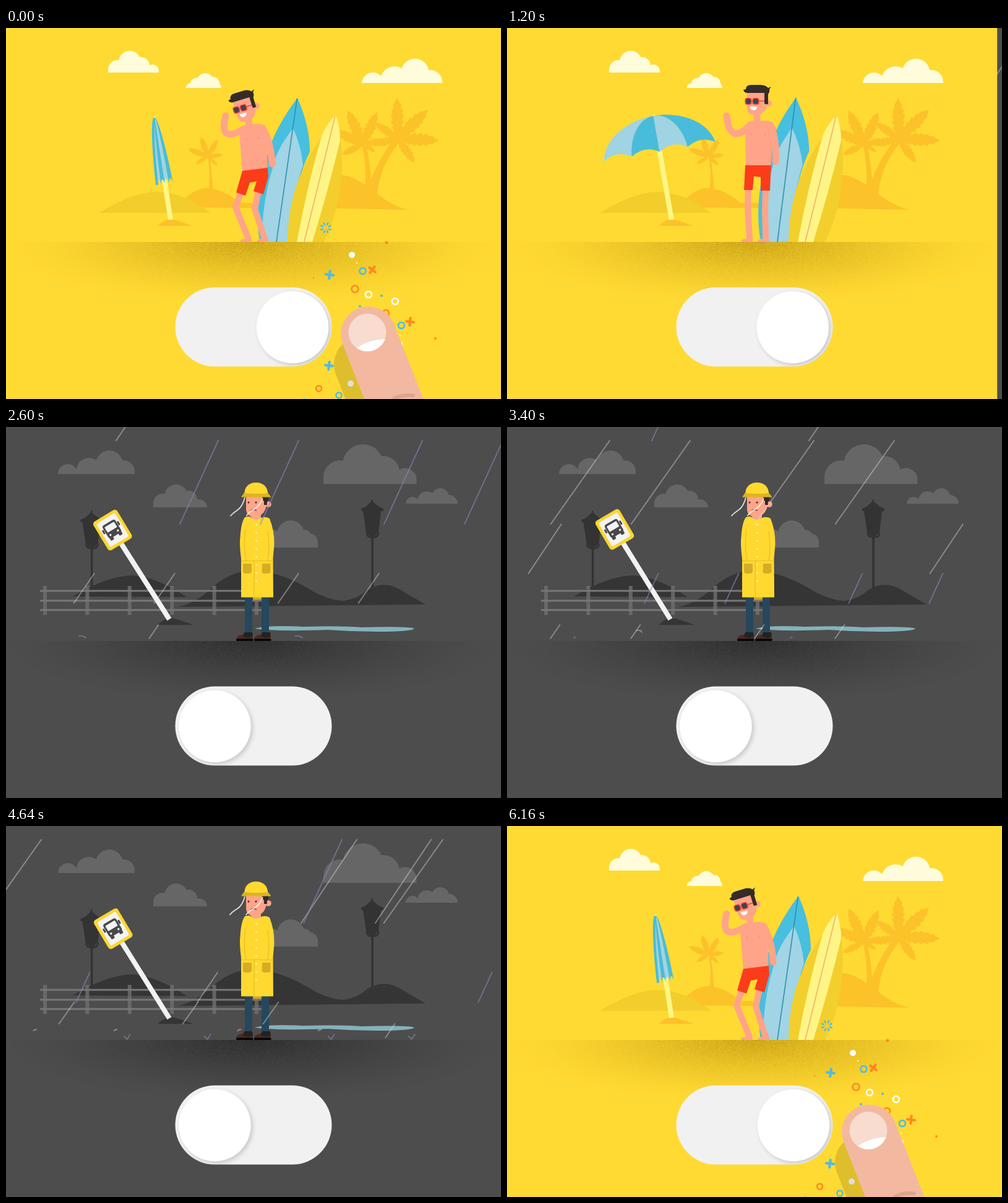
These frames come from a looping animation (800 by 600 pixels, 6.2 s). An HTML page with a canvas:

```html
<!DOCTYPE html>
<html lang="en">
<head>
<meta charset="utf-8">
<title>Weather switch</title>
<style>
html, body { margin: 0; width: 100%; height: 100%; overflow: hidden; background: #ffda33; }
canvas { display: block; }
</style>
</head>
<body>
<canvas id="stage" width="800" height="600"></canvas>
<script>
const c = document.getElementById('stage').getContext('2d');
const LOOP = 6200, STEP = 40;
const SKIN = '#ffa488', SAND = '#fcc22a', DARK = '#353535', GOLD = '#ffd930';

const clamp = u => Math.max(0, Math.min(1, u));
const span = (t, a, b) => clamp((t - a) / (b - a));
const inOut = u => u < .5 ? 2 * u * u : 1 - 2 * (1 - u) * (1 - u);
const out = u => 1 - Math.pow(1 - u, 3);
const mix = (a, b, k) => a + (b - a) * k;
const rad = d => d * Math.PI / 180;

function shape(color, d) { c.fillStyle = color; c.fill(new Path2D(d)); }
function line(color, w, d, cap = 'butt') {
  c.strokeStyle = color; c.lineWidth = w; c.lineCap = cap; c.lineJoin = 'round';
  c.stroke(new Path2D(d));
}
function disc(color, x, y, r) {
  c.fillStyle = color; c.beginPath(); c.arc(x, y, r, 0, 7); c.fill();
}
function box(color, x, y, w, h, r = 0) {
  c.fillStyle = color; c.beginPath(); c.roundRect(x, y, w, h, r); c.fill();
}
function at(x, y, deg, draw) {
  c.save(); c.translate(x, y); c.rotate(rad(deg)); draw(); c.restore();
}

// Grainy half-ellipse under the feet
function grain(r, g, b, strength) {
  const el = document.createElement('canvas');
  el.width = 800; el.height = 110;
  const g2 = el.getContext('2d'), img = g2.createImageData(800, 110);
  let seed = 7;
  for (let i = 0; i < 800 * 110; i++) {
    seed = (seed * 16807) % 2147483647;
    const x = i % 800, y = i / 800 | 0;
    const d = Math.hypot((x - 400) / 400, y / 100);
    const a = strength * Math.pow(Math.max(0, 1 - d), 1.4) * (.7 + .6 * seed / 2147483647);
    img.data.set([r, g, b, 255 * Math.min(1, a)], i * 4);
  }
  g2.putImageData(img, 0, 0);
  return el;
}
const warmGround = grain(160, 118, 0, .5), coldGround = grain(22, 22, 22, .52);

function cloud(color, base, lobes) {
  c.save();
  c.beginPath(); c.rect(0, 0, 800, base); c.clip();
  c.fillStyle = color;
  for (const [x, y, r] of lobes) {
    c.beginPath(); c.arc(x, y, r, 0, 7); c.rect(x - r, y, 2 * r, base - y); c.fill();
  }
  c.restore();
}

function leaf(x, y, tx, ty) {
  const len = Math.hypot(tx - x, ty - y), n = 7;
  at(x, y, Math.atan2(ty - y, tx - x) * 180 / Math.PI, () => {
    c.beginPath(); c.moveTo(0, 0);
    const h = s => len * .17 * Math.pow(Math.sin(Math.PI * clamp(s)), .7);
    for (let i = 1; i < n; i++) {
      c.lineTo(len * i / n, -h(i / n));
      c.lineTo(len * (i + .1) / n, -h(i / n) * .68);
    }
    c.lineTo(len, 0);
    for (let i = n - 1; i > 0; i--) {
      c.lineTo(len * (i + .1) / n, h(i / n) * .68);
      c.lineTo(len * i / n, h(i / n));
    }
    c.fill();
  });
}
function palm(x, y, trunk, tips) {
  shape(SAND, trunk);
  for (const [tx, ty] of tips) leaf(x, y, tx, ty);
}

function umbrella(o) {
  at(266, 310, mix(-8.8, -9.9, o), () => {
    const top = -mix(167, 170.5, o), rim = -mix(59, 111.5, o), w = mix(13, 91.5, o);
    const inner = mix(.3, .46, o), outer = mix(.8, .93, o);
    box('#fff685', -4, mix(-66, -113, o), 8, -mix(-66, -113, o), 0);
    const ctl = k => [k * w * inner, top, k * w * outer, mix(rim, top, .62)];
    for (let i = 0; i < 4; i++) {
      const a = i / 2 - 1, b = a + .5, A = ctl(a), B = ctl(b);
      shape(i % 2 ? '#49bcdb' : '#a0d3e3',
        `M0 ${top}C${A} ${a * w} ${rim}Q${(a + b) / 2 * w} ${rim - 15} ${b * w} ${rim}` +
        `C${B[2]} ${B[3]} ${B[0]} ${B[1]} 0 ${top}Z`);
    }
    if (o < .5) line('#49bcdb', 4 * (1 - 2 * o), `M0 ${top}C${ctl(-1)} ${-w} ${rim}`);
    line('#fff685', 3, `M0 ${top}v-2`);
  });
}

function boards(lean) {
  at(437, 346, lean, () => {
    c.translate(-437, -346);
    shape('#47bfdf', 'M471 113Q491 158 491 200Q474 235 465 285L456 346H410Q401 290 418 222Q428 170 471 113Z');
    shape('#a1d4e4', 'M464 162Q477 190 480 222Q466 260 457 346H414Q413 285 431 226Q436 198 464 162Z');
    line('#2f8fa8', 1.6, 'M470.500 114L437 346');
  });
  shape('#f2cf2d', 'M509 177Q480 220 466 265Q455 305 455 346H514Q541 290 543 225Q543 185 538 160Z');
  shape('#fff587', 'M533 141Q541 165 540 182Q521 262 495 346H470Q487 255 510 175Q519 153 533 141Z');
  line('#f5b564', 1.7, 'M532 142L482 346');
}

// Each joint: first pose x, y, second pose x, y
function swimmer(k) {
  const p = (ax, ay, bx, by) => `${mix(ax, bx, k)} ${mix(ay, by, k)} `;
  const limb = (d, w = 10) => line(SKIN, w, d, 'round');
  for (const dx of [0, 27]) {
    shape(SKIN, `M${378 + dx} 346q0 -5 8 -5h11v5z`);
  }
  limb('M' + p(380, 264, 390, 260) + 'L' + p(371, 290, 389, 290) + 'L392 341');
  limb('M' + p(408, 264, 418, 260) + 'L' + p(402, 292, 417, 294) + 'L418 341');
  limb('M' + p(385, 163, 392, 158) + 'Q' + p(343, 188, 360, 190) + p(355, 142, 355, 142), 11);
  limb('M' + p(415, 162, 426, 157) + 'Q' + p(429, 188, 436, 180) + p(430, 220, 434, 216), 11);
  shape(SKIN, 'M' + p(377, 170, 385, 162) + 'Q' + p(376, 157, 386, 150) + p(392, 156, 398, 150) +
    'L' + p(408, 155, 420, 150) + 'Q' + p(419, 154, 431, 150) + p(420, 168, 431, 164) +
    'L' + p(423, 231, 426, 225) + 'L' + p(382, 233, 386, 225) + 'Z');
  for (const d of [p(387, 180, 394, 172), p(407, 178, 416, 172)]) line('#d98166', 1.5, `M${d}h1.500`);
  shape('#fb3c1b', 'M' + p(382, 231, 385, 222) + 'L' + p(423, 226, 427, 222) + 'L' + p(424, 240, 426, 240) +
    'L' + p(416, 269, 425, 263) + 'L' + p(400, 264, 410, 263) + 'L' + p(405, 248, 410, 241) +
    'L' + p(394, 250, 399, 240) + 'L' + p(387, 271, 397, 262) + 'L' + p(372, 266, 383, 262) + 'Z');
  limb('M' + p(393, 160, 404, 154) + 'L' + p(392, 147, 404, 138), 11);
  at(mix(378, 396, k), mix(130.3, 118, k), mix(-17, 0, k), () => {
    c.translate(-396, -118);
    disc(SKIN, 423, 122, 5);
    shape(SKIN, 'M388 102H421V122Q418 141 401 141Q388 141 388 128Z');
    shape('#352b28', 'M382 100Q383 104 387 105H416V122Q417 124 422 123V107Q425 103 424 99L427 95L422 97Q418 92 408 92H395Q386 92 386 99Z');
    line('#e2452f', 1.6, 'M386 118H416');
    for (const x of [390, 402]) {
      box('#e2452f', x - 5.5, 113, 11, 11, 3.5);
      box('#3d4357', x - 3.8, 114.5, 7.6, 8, 2.5);
    }
    shape('#fff', 'M393 127H404Q404 133 398 133Q393 133 393 127Z');
  });
}

function beach(T) {
  box('#ffda33', 0, 0, 800, 600);
  const cream = '#fffcdb';
  cloud(cream, 72, [[180, 67, 15], [200, 55, 18], [218, 61, 14], [237, 69, 10]]);
  cloud(cream, 97, [[298, 97, 7.5], [308, 91, 10.5], [322, 86.5, 13.5], [335, 89, 10], [340.5, 96, 7.5]]);
  cloud(cream, 89, [[593, 90, 18], [628, 85, 23], [661, 72, 22.5], [686, 87, 19]]);
  shape(SAND, 'M276 290Q302 259 323 259Q350 259 378 283L408 283V291ZM378 284Q390 288 410 283V291H360Z');
  shape(SAND, 'M500 291Q505 238 545 238Q562 239 595 264Q622 287 650 294Z');
  shape('#f2cd2c', 'M150 299Q205 265 245 265Q290 267 330 299Z');
  palm(326, 208, 'M326 208Q331 235 327 265H335Q333 235 329 208Z',
    [[315, 176], [342, 180], [351, 205], [342, 222], [306, 220], [294, 195]]);
  palm(577, 188, 'M574 185Q584 220 580 270H591Q590 220 581 185Z',
    [[552, 133], [600, 136], [613, 181], [597, 200], [542, 205], [530, 165]]);
  palm(633, 179, 'M628 178Q592 225 583 270H600Q604 220 640 180Z',
    [[632, 113], [682, 132], [700, 182], [661, 218], [596, 153], [590, 189]]);
  shape(SAND, 'M245 320Q256 309 268 309Q279 312 302 320Z');
  const u = span(T, 0, 640);
  umbrella(1 - Math.pow(1 - u, 3) * Math.cos(u * 8.5));
  const k = inOut(span(T, 0, 520));
  boards(-k);
  swimmer(k);
  c.drawImage(warmGround, 0, 346);
}

function lamp(x, y, foot) {
  c.save(); c.translate(x, y);
  box('#333', -1.7, 55, 3.6, foot - y - 55);
  shape('#333', 'M-1 0h2v4l10 8 7 3v4h-4l-4 34 -6 6h-8l-6 -6 -5 -34h-3v-4l7 -3 9 -8z');
  line('#333', 3, 'M-9 55Q-8 61 -2 61Q0 61 0 65Q1 61 3 61Q9 61 10 55', 'round');
  c.restore();
}

function busSign(sway) {
  at(264, 311, -32.4 + sway, () => {
    box('#f2f2f2', -4, -149, 8, 149);
    at(0, -171, 1.3, () => {
      box('#fcd62f', -22.5, -27, 45, 54, 5);
      box('#f3f3f3', -17.500, -22, 35, 44, 2);
      box('#484848', -12, -14, 24, 24, 4);
      box('#f3f3f3', -9, -10.500, 18, 10, 1);
      for (const s of [-1, 1]) {
        box('#484848', s * 8 - 3, 8, 6, 6, 1.5);
        box('#484848', s * 14 - 1.5, -8, 3, 7, 1);
        disc('#f3f3f3', s * 7, 5, 1.7);
      }
    });
  });
}

function walker(f) {
  for (const x of [372, 401]) {
    box('#26475d', x === 372 ? 386 : 413, 270, 12, 65);
    shape('#4b2a22', `M${x} 343q1 -6 9 -7l6 -2h12v9z`);
    shape('#222', `M${x + 11} 339l2 -7h13v7l-6 2z`);
    box('#050505', x, 342.500, 27.5, 3.5, 1);
  }
  box('#d5aa20', 399, 272, 14, 7.500);
  box('#f2a78e', 396, 138, 16, 14);
  shape(GOLD, 'M386 146Q395 143 396 147Q404 153 412 147Q420 144 426 148Q434 168 433.500 190L431.500 213L432 275.500H380V213Q377 190 378.500 178Q380 154 386 146Z');
  line('#e6bb24', 1.1, 'M387 165Q383 195 388 216M423 168Q427 195 423 216M380 216.500H432M401 217V276');
  for (let y = 158; y < 255; y += 13) disc('#fff7d0', 404.500, y, 1.3);
  shape('#d6ac25', 'M383 221h14v14l-3 2h-8l-3 -2zM414 221h13.500v14l-3 2h-8l-3 -2z');
  disc(SKIN, 424, 125, 4.800);
  shape(SKIN, 'M388 111H421V126Q418 145 401 145Q388 145 388 132Z');
  shape('#352823', 'M414 111H424V118Q421 121 422 126H417V120L414 117Z');
  disc('#382a26', 392, 122, 1.5);
  disc('#382a26', 404, 122, 1.5);
  line('#7c3c30', 1.6, 'M395 135.500Q400 131.500 405 135.500');
  shape('#deb323', 'M385 106H423L428.500 113.500H380Z');
  shape(GOLD, 'M385.500 107C385 84 423 84 423 107Q404 109 385.500 107Z');
  const j = (f * 5 % 4) - 1.5;
  line('rgba(255,255,255,.85)', 1.7, `M386 114q-4 15 ${-11 + j} 20t-12 10M415 115q-5 13 -14 18t${-12 + j} 11`);
}

// Streak families: colour, x at y 22, slope, phase, copies
const four = [0, 130, 330, 460];
const W = 'rgba(225,225,230,.42)', V = 'rgba(138,132,185,.58)';
const rain = [
  [W, 291, .69, 9, four], [V, 343, .459, 11, four], [W, 178, .667, 12, [0, 649]],
  [W, 166, .706, 13, four], [V, 234, .459, 14, [0, 650]], [W, 488, .68, 14, [0]],
  [W, 567, .667, 16, [0, 120]], [W, 57, .706, 16, [0, 649]], [V, 543, .459, 16, [0]],
  [W, 365, .7, 0, [0]], [V, 623, .459, 0, [0, 120]], [V, 282, .459, 5, [0, 350]],
  [W, 449, .68, 7, [0]]
];
const falls = [-20, 22, 157, 237, 285, 320, 342];

function drawRain(t, f) {
  const beat = t > 3900 ? f - 10 : f;
  for (const [color, x0, slope, phase, copies] of rain) {
    const s = (beat - phase + 1 + 36) % 18;
    if (s > 9) continue;
    for (const dx of copies) {
      const x = y => x0 + dx - slope * (y - 22), land = x(343);
      if (s < 6) {
        line(color, 2, `M${x(falls[s])} ${falls[s]}L${x(falls[s + 1])} ${falls[s + 1]}`, 'round');
      } else if (s === 6) {
        line(color, 2, `M${land - 5} 340L${land} 345L${land + 5} 337`, 'round');
      } else {
        const white = color === W, y = white ? 329 : 338;
        if (s === 7) line(color, 2, `M${land - 17 - white * 4} ${y}q7 -1 ${white ? 8 : 11} 3`, 'round');
        if (s === 8) line(color, 2, `M${land - 25} ${y + 2}q2 -2 5 -2`, 'round');
        if (s === 9) line(color, 2, `M${land - 27} ${y + 3}l3 -1`, 'round');
      }
    }
  }
}

function storm(t, f) {
  box('#4d4d4d', 0, 0, 800, 600);
  const gray = '#666';
  cloud(gray, 76, [[100, 76, 16], [134, 70, 20], [167, 60, 22], [190, 72, 18]]);
  cloud(gray, 130, [[253, 123, 15], [275, 112, 19], [295, 117, 14], [312, 130, 13]]);
  cloud(gray, 92, [[540, 81, 27], [577, 61, 33], [610, 73, 26], [645, 85, 18.5]]);
  cloud(gray, 124, [[657, 124, 11], [680, 119, 15], [702, 113, 14], [716, 124, 14]]);
  cloud(gray, 195, [[430, 180, 14], [460, 173, 22], [481, 180, 14], [490, 186, 14]]);
  lamp(138.500, 135, 268);
  lamp(592, 117, 262);
  shape(DARK, 'M108 274Q165 240 205 240Q245 243 292 275Z');
  shape(DARK, 'M278 291Q310 283 335 258Q365 233 393 233Q440 230 500 268Q530 282 547 281Q570 277 583 264Q612 246 640 265L678 287Z');
  for (let i = 0; i < 6; i++) box('rgba(112,112,112,.8)', 60 + i * 68.4, 257, 6, 47);
  for (const y of [263.500, 279.500, 294.500]) box('#777', 55, y, 358, 3);
  shape('#84b2ba', 'M402 326Q425 320 480 323Q540 321 575 324Q650 322 660 326Q655 331 600 331Q560 331 520 328Q440 331 402 326Z');
  shape(DARK, 'M245 320Q256 309 268 309Q282 312 303 320Z');
  busSign(.3 - .35 * Math.cos((t - 2600) / 255));
  c.drawImage(coldGround, 0, 346);
  walker(f);
  drawRain(t, f);
}

// Burst pieces: kind, colour, x, y, size
const O = '#ff8820', B = '#4fbbe6', N = '#fff';
const bits = [
  ['sun', B, 517, 323, 9], ['dot', N, 559, 367, 5], ['dot', N, 567, 380, 1], ['plus', B, 523, 399, 6],
  ['cross', O, 592, 391, 6], ['ring', B, 576.5, 393, 5], ['ring', O, 564, 422, 5.5], ['ring', N, 586, 431, 5],
  ['ring', N, 629, 442, 5], ['dot', B, 607, 433, 2], ['dot', B, 572, 450, 2], ['ring', O, 614, 461, 5],
  ['ring', B, 639, 481, 5], ['plus', O, 653, 475, 6], ['dot', N, 637, 497, 1], ['dot', N, 637, 511, 4],
  ['dot', O, 694, 502, 2], ['dot', O, 615, 347, 2.5], ['dot', O, 497, 404, 1.2], ['plus', B, 522, 546, 6],
  ['ring', O, 505.5, 583, 4.5], ['ring', B, 538, 594, 4.5], ['dot', B, 482, 601, 2], ['dot', N, 557, 575, 5]
];

function burst(T) {
  if (T <= -200 || T >= 520) return;
  const grow = 1.228 * (1 - Math.pow(1 - span(T, -200, 500), 5));
  const size = T < 0 ? 1 : 1 - Math.pow(T / 520, 2);
  for (const [kind, color, x, y, r0] of bits) {
    const r = r0 * size;
    at(575 + (x - 575) * grow, 480 + (y - 480) * grow, T / 8, () => {
      if (kind === 'dot') disc(color, 0, 0, r);
      else if (kind === 'ring') line(color, 2.6 * size, `M${r} 0A${r} ${r} 0 1 1 ${-r} 0A${r} ${r} 0 1 1 ${r} 0`);
      else if (kind === 'sun') {
        c.rotate(Math.PI / 8);
        for (let i = 0; i < 8; i++) {
          c.rotate(Math.PI / 4);
          line(color, 2.4 * size, `M${r * .62} 0H${r * .92}`, 'round');
        }
      } else {
        c.rotate(kind === 'plus' ? .12 : .65);
        line(color, 4.2 * size, `M${-r} 0H${r}M0 ${-r}V${r}`, 'round');
      }
    });
  }
}

function finger(x, y) {
  at(x - 11, y + 49, -21.5, () => box('rgba(0,0,0,.13)', -44.5, -44.5, 89, 420, 44.5));
  at(x, y, -21.5, () => {
    box('#f2b9a0', -44.5, -44.5, 89, 420, 44.5);
    line('#dca58d', 6, 'M1 112Q16 111 31 119', 'round');
  });
  disc('#f7dccf', x - 1.5, y - 2.5, 30.5);
  c.save();
  c.beginPath(); c.arc(x - 1.5, y - 2.5, 30.5, 0, 7); c.clip();
  shape('#fff', `M${x - 18} ${y + 22}Q${x + 3} ${y + 8} ${x + 32} ${y + 8}V${y + 40}H${x - 25}Z`);
  c.restore();
}

function toggle(x) {
  box('#f1f1f1', 273.500, 419.500, 253, 128, 64);
  c.save();
  c.beginPath(); c.roundRect(273.500, 419.500, 253, 128, 64); c.clip();
  c.shadowColor = 'rgba(0,0,0,.17)'; c.shadowBlur = 7; c.shadowOffsetX = 3; c.shadowOffsetY = 3;
  disc('#fff', x, 484, 58.300);
  c.restore();
}

function hand(T) {
  if (T < -720 || T > 420) return;
  if (T < -420) {
    const k = out(span(T, -720, -430));
    return finger(mix(445, 345, k), mix(690, 495, k));
  }
  if (T <= 0) return finger(mix(345, 585.5, inOut(span(T, -420, -40))), 495);
  const k = Math.pow(span(T, 0, 420), 1.5);
  finger(mix(585.5, 655, k), mix(495, 690, k));
}

function draw(t) {
  const f = Math.floor(t / STEP);
  t = f * STEP;
  const T = t > 3000 ? t - 6160 : t;
  const sunny = t < 3000 ? 1 - inOut(span(t, 1125, 2200)) : inOut(span(T, -420, -60));
  const edge = 800 * sunny;
  c.setTransform(1, 0, 0, 1, 0, 0);
  if (edge < 800) storm(t, f);
  if (edge > 0) {
    c.save();
    c.beginPath(); c.rect(0, 0, edge, 600); c.clip();
    beach(T);
    c.restore();
  }
  toggle(mix(337.500, 463, sunny));
  burst(T);
  hand(T);
}

let start;
function tick(now) {
  if (start === undefined) start = now;
  draw((now - start + .5) % LOOP);
  requestAnimationFrame(tick);
}
draw(0);
requestAnimationFrame(tick);
</script>
</body>
</html>
```
